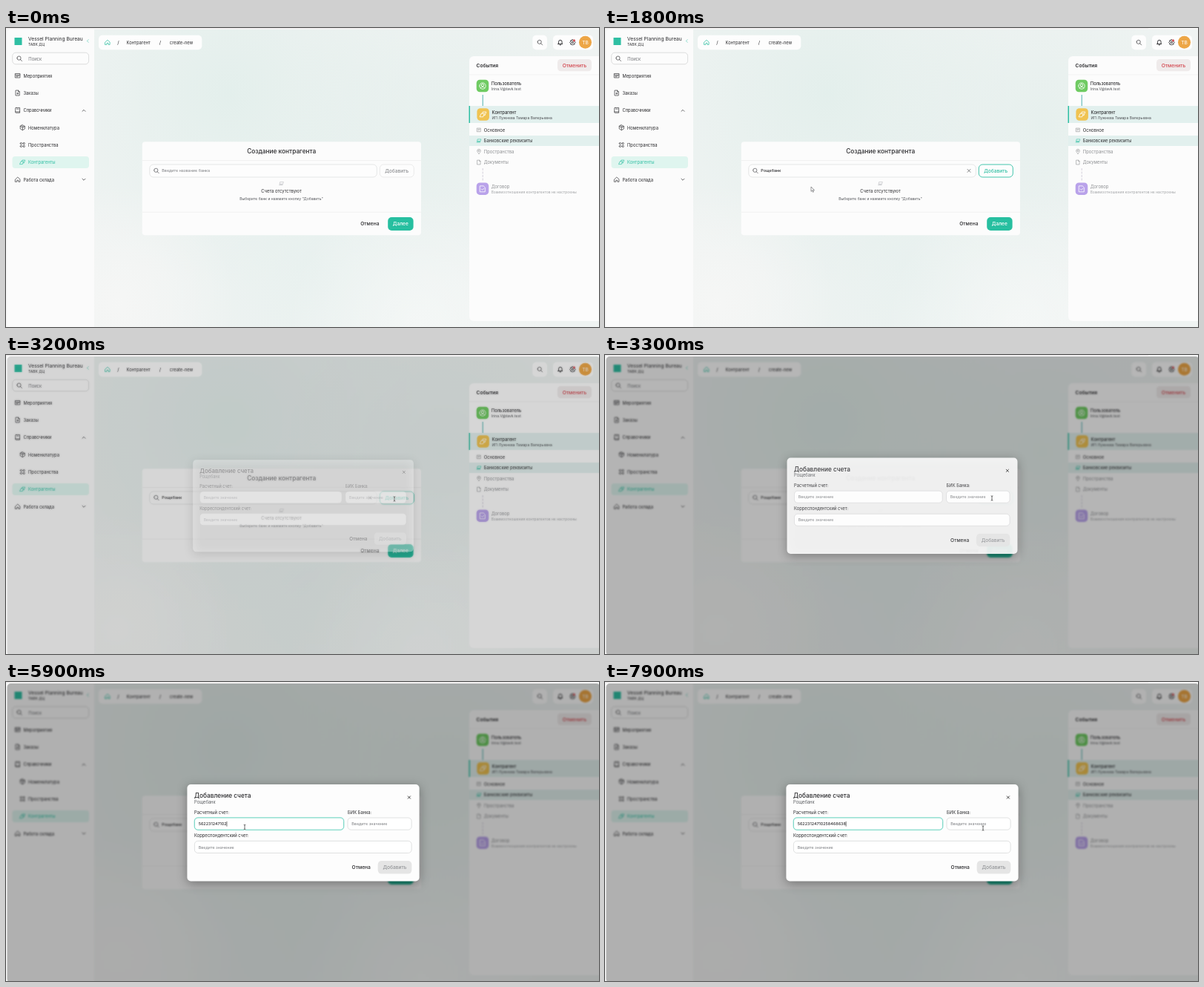
Recreate the animation shown at these times as an HTML page with a canvas. Size 800 by 403 pixels, loop 8000 ms.

```html
<!DOCTYPE html>
<html lang="ru">
<head>
<meta charset="utf-8">
<title>Создание контрагента</title>
<style>
html, body { margin: 0; width: 100%; height: 100%; overflow: hidden; background: #f6f6f6; }
canvas { display: block; width: 800px; height: 403px; }
</style>
</head>
<body>
<canvas id="stage"></canvas>
<script>
const W = 800, H = 403, LOOP = 8000;
const dpr = window.devicePixelRatio || 1;
const INK = '#2b2b2e', GREY = '#8d8f92', TEAL = '#2fbfa3', LINE = '#dcdddd';
const BANK = 'Рощебанк', ACCOUNT = '56223124710258468638';
const FONT = 'Inter, "Open Sans", sans-serif';

function makeCtx(canvas) {
  canvas.width = W * dpr;
  canvas.height = H * dpr;
  const c = canvas.getContext('2d');
  c.scale(dpr, dpr);
  return c;
}
const stage = makeCtx(document.getElementById('stage'));
const page = makeCtx(document.createElement('canvas'));
let g = page;

const ICONS = {
  home: 'M3 11 12 3l9 8v10h-6v-6h-6v6H3z',
  search: 'M3 10.5a7.5 7.5 0 1 0 15 0a7.5 7.5 0 1 0-15 0M16 16l6 6',
  calendar: 'M3 4h18v16H3zM3 9h18M7 13h4M14 13h3M7 16.500h4',
  doc: 'M5 2h9l5 5v15H5zM14 2v5h5M9 14h6M12 11v6',
  file: 'M5 2h9l5 5v15H5zM14 2v5h5',
  book: 'M5 2h15v20H5a2 2 0 0 1-2-2V4a2 2 0 0 1 2-2M3 18h17M8 7h8',
  box: 'M12 2 21 7v10l-9 5-9-5V7zM3 7l9 5 9-5M12 12v10M7.500 4.500l9 5',
  grid: 'M3 6.500a3.500 3.500 0 1 0 7 0a3.500 3.500 0 1 0-7 0M14 6.500a3.500 3.500 0 1 0 7 0a3.500 3.500 0 1 0-7 0M3 17.500a3.500 3.500 0 1 0 7 0a3.500 3.500 0 1 0-7 0M14 17.500a3.500 3.500 0 1 0 7 0a3.500 3.500 0 1 0-7 0',
  deal: 'M7 9h9l-4 11H2zM9 9l2-5h11l-4 11h-4',
  bell: 'M6 17v-7a6 6 0 0 1 12 0v7l2 1H4zM10 21.500h4',
  gear: 'M12 2l3 3h4v4l3 3-3 3v4h-4l-3 3-3-3H5v-4l-3-3 3-3V5h4zM9 12a3 3 0 1 0 6 0a3 3 0 1 0-6 0',
  pin: 'M12 22C6 15 4 13 4 9a8 8 0 0 1 16 0c0 4-2 6-8 13zM9 9a3 3 0 1 0 6 0a3 3 0 1 0-6 0',
  user: 'M2 12a10 10 0 1 0 20 0a10 10 0 1 0-20 0M8 9.500a4 4 0 1 0 8 0a4 4 0 1 0-8 0M5 19c3-5 11-5 14 0',
  edit: 'M4 4h16v16H4zM8 9h8M8 14h5',
  check: 'M4 3h11l5 5v14H4zM8 13l3 3 5-5',
  cards: 'M7 5h15l-3 9H5zM2 19h15M4 16.500h14',
  down: 'M4 8l8 8 8-8',
  up: 'M4 16l8-8 8 8',
  left: 'M16 4l-8 8 8 8',
  cross: 'M4 4l16 16M20 4 4 20'
};

function icon(name, x, y, size, color, weight = 1.9) {
  g.save();
  g.translate(x - size / 2, y - size / 2);
  g.scale(size / 24, size / 24);
  g.strokeStyle = color;
  g.lineWidth = weight;
  g.lineCap = g.lineJoin = 'round';
  g.stroke(new Path2D(ICONS[name]));
  g.restore();
}

// x1, y1, x2, y2 are the edges of the box
function box(x1, y1, x2, y2, r, fill, stroke, width = 0.7) {
  g.beginPath();
  g.roundRect(x1, y1, x2 - x1, y2 - y1, r);
  if (fill) { g.fillStyle = fill; g.fill(); }
  if (stroke) { g.strokeStyle = stroke; g.lineWidth = width; g.stroke(); }
}

// y is the middle of the capitals
function text(s, x, y, size = 5.83, color = INK, weight = 400, align = 'left') {
  g.font = `${weight} ${size}px ${FONT}`;
  g.textAlign = align;
  g.fillStyle = color;
  g.fillText(s, x, y + size * 0.364);
  return g.measureText(s).width;
}

function line(x1, y1, x2, y2, color, width = 0.6, dash = []) {
  g.beginPath();
  g.moveTo(x1, y1);
  g.lineTo(x2, y2);
  g.setLineDash(dash);
  g.strokeStyle = color;
  g.lineWidth = width;
  g.stroke();
  g.setLineDash([]);
}

function glow(x, y, r, rgb, alpha) {
  const grad = g.createRadialGradient(x, y, 0, x, y, r);
  grad.addColorStop(0, `rgba(${rgb},${alpha})`);
  grad.addColorStop(1, `rgba(${rgb},0)`);
  g.fillStyle = grad;
  g.fillRect(119, 0, W - 119, H);
}

function clipFrame() {
  g.beginPath();
  g.roundRect(1.5, 2, W, H, 5);
  g.clip();
}

function drawSidebar() {
  box(1, 1, 119, H, 0, '#fbfbfb');
  box(11.5, 13, 21.5, 23, 0, TEAL);
  text('Vessel Planning Bureau', 30, 14.9, 6.67);
  text('ТАВК ДЦ', 30, 22.1, 5);
  icon('left', 110.3, 17.5, 5.5, TEAL, 2.4);
  box(8.7, 33.2, 111.6, 48.8, 4.5, '#fcfcfc', '#cfd0d0');
  icon('search', 18, 41.1, 8.3, INK);
  text('Поиск', 30.3, 41.5, 5.83, '#707276');
  box(8.5, 173, 112, 189, 4, '#dff5ef');

  const menu = [
    ['calendar', 'Мероприятия', 0], ['doc', 'Заказы', 0], ['book', 'Справочники', 0],
    ['box', 'Номенклатура', 1], ['grid', 'Пространства', 1], ['deal', 'Контрагенты', 1],
    ['home', 'Работа склада', 0]
  ];
  menu.forEach(([name, label, deep], i) => {
    const y = 64.4 + i * 23.33, color = i === 5 ? TEAL : INK;
    icon(name, deep ? 22.3 : 15.8, y - 0.2, 8.3, color);
    text(label, deep ? 30 : 23.4, y, 5.83, color);
  });
  icon('up', 105, 111.3, 6, INK, 2.8);
  icon('down', 105, 204.2, 6, INK, 2.8);
}

function drawHeader() {
  box(125, 9.7, 264.3, 29.2, 5, '#fdfdfd');
  icon('home', 137, 19.3, 8.3, TEAL, 2.1);
  text('/', 150.3, 19.5, 6.67);
  text('Контрагент', 162.5, 19.6);
  text('/', 206.8, 19.5, 6.67);
  text('create-new', 220.8, 19.6);
  box(710.3, 9.7, 730, 29.2, 5, '#fdfdfd');
  icon('search', 720.2, 19.4, 8.3, INK);
  box(738, 9.7, 792, 29.2, 5, '#fdfdfd');
  icon('bell', 747.8, 19.3, 9, INK, 2.5);
  icon('gear', 764.4, 19.4, 9, INK, 2.5);
  box(764.8, 15.2, 768, 18.4, 1.6, '#d9545a');
  box(773, 10.8, 790, 27.8, 8.5, '#eda646');
  text('ТВ', 781.5, 19.5, 6.67, '#fff', 400, 'center');
}

function badge(name, x, y, color) {
  box(x, y, x + 16.5, y + 16.5, 4.5, color);
  icon(name, x + 8.25, y + 8.25, 10, '#fff', 2);
}

function drawEvents() {
  box(625, 38, 806, 395, 6, '#fcfcfc');
  text('События', 634.5, 50.5, 6.67, INK, 600);
  box(744, 42, 790, 58.2, 4.5, '#efebeb');
  text('Отменить', 767, 50.4, 6.67, '#d3474f', 500, 'center');
  line(625, 63, W, 63, '#ececec');

  badge('user', 634.7, 69.8, '#6fcb62');
  text('Пользователь', 654.8, 75.3, 5.83, INK, 500);
  text('Irina.V@tavk.test', 654.8, 82.6, 5, '#4c4e52');
  line(643.2, 90, 643.2, 105, '#4cb3ad', 1);

  box(625, 105, W, 128, 0, '#e2f0ee');
  box(624.5, 105, 626, 128, 0, TEAL);
  badge('deal', 635.4, 108.2, '#f0c352');
  text('Контрагент', 655.6, 113.8, 5.83, INK, 500);
  text('ИП Лужнева Тамара Валерьевна', 655.6, 121, 5, '#4c4e52');

  box(625, 145, W, 159, 0, '#e2f0ee');
  const steps = [
    ['edit', 'Основное', INK, GREY], ['cards', 'Банковские реквизиты', INK, TEAL],
    ['pin', 'Пространства', GREY, GREY], ['file', 'Документы', GREY, GREY]
  ];
  steps.forEach(([name, label, ink, tint], i) => {
    const y = 137.5 + i * 14.55;
    icon(name, 638, y - 0.1, 7, tint, 2);
    text(label, 644.8, y, 5.83, ink);
  });
  line(643.2, 189, 643.2, 206, '#c9c6d4', 0.8, [3, 1.5]);
  badge('check', 634.7, 208.4, '#b9a2ea');
  text('Договор', 654.8, 214.2, 5.83, GREY);
  text('Взаимоотношения контрагентов не настроены', 654.8, 221, 5, '#a2a4a7');
}

function drawForm(bank) {
  box(183.8, 153.3, 560, 279.2, 4, '#fcfcfc');
  text('Создание контрагента', 371.7, 166.4, 8.33, INK, 500, 'center');
  line(184, 178.6, 560, 178.6, '#e8e8e8');
  box(193.8, 184, 500.3, 201, 5, '#fdfdfd', LINE);
  icon('search', 202.8, 192.3, 8.3, '#44464a');
  if (bank) {
    text(bank, 210.3, 192.5, 5.42, INK, 500);
    icon('cross', 491, 192.4, 6, '#44464a', 2.6);
  } else {
    text('Введите название банка', 210.3, 192.5, 5.42, '#7c7e82');
  }
  box(504.3, 184, 550.3, 201, 5, '#fdfdfd', bank ? TEAL : '#e2e2e2', bank ? 0.9 : 0.7);
  text('Добавить', 527.3, 192.6, 6.67, bank ? TEAL : GREY, 500, 'center');

  icon('cards', 371.5, 209.6, 7, '#b9bbbd', 2);
  text('Счета отсутствуют', 371.5, 220.1, 5.83, INK, 400, 'center');
  text('Выберите банк и нажмите кнопку "Добавить"', 371.5, 229.8, 5, '#55575b', 400, 'center');

  line(184, 248.2, 560, 248.2, '#e8e8e8');
  text('Отмена', 490.8, 264, 6.67, INK, 500, 'center');
  box(515.2, 255, 549.6, 273, 5, '#27bfa0');
  text('Далее', 532.4, 264, 6.67, '#fff', 500, 'center');
}

function drawPage(bank) {
  g = page;
  box(0, 0, W, H, 0, '#f7f7f7');
  box(0, 0, 733, 1, 0, '#efebec');
  g.save();
  clipFrame();
  box(119, 0, W, H, 0, '#eff3f2');
  glow(300, 90, 260, '218,236,231', 0.55);
  glow(590, 130, 220, '222,237,233', 0.5);
  glow(420, 330, 230, '226,239,236', 0.5);
  glow(150, 370, 160, '247,247,246', 0.8);
  glow(560, 400, 180, '247,249,248', 0.7);
  drawSidebar();
  drawHeader();
  drawEvents();
  drawForm(bank);
  g.restore();
}

function input(x1, y1, x2, y2, value, focused, caret) {
  if (focused) box(x1, y1, x2, y2, 4.5, null, 'rgba(70,205,185,.25)', 2);
  box(x1, y1, x2, y2, 4.5, '#fff', focused ? '#3fc4ae' : '#d3d4d5');
  const y = (y1 + y2) / 2 + 0.2;
  const w = value ? text(value, x1 + 5.3, y, 5.42, INK, 500) : 0;
  if (!value) text('Введите значение', x1 + 5.3, y, 5.42, '#7c7e82');
  if (caret) line(x1 + 5.6 + w, y - 3.4, x1 + 5.6 + w, y + 3.4, '#111');
}

function drawModal(a, account, focused, caret) {
  const s = 0.9 + 0.1 * a;
  g.save();
  g.globalAlpha = Math.pow(a, 1.5);
  g.translate(401, 203.2);
  g.scale(s, s);
  g.translate(-401, -203.2);
  g.shadowColor = 'rgba(0,0,0,.35)';
  g.shadowBlur = 14 * dpr;
  g.shadowOffsetY = 3 * dpr;
  box(244.4, 138, 557.6, 268.5, 5, '#fdfdfd');
  g.shadowColor = 'transparent';
  text('Добавление счета', 254, 153.3, 8.33, INK, 500);
  text(BANK, 254, 161.5, 5.83, '#5c5e62');
  icon('cross', 543.9, 155.5, 5, '#222', 4);
  text('Расчетный счет:', 254, 175.8);
  text('БИК Банка:', 461, 175.8);
  input(254.4, 183, 455.6, 199.2, account, focused, caret);
  input(461, 183, 547.1, 199.2);
  text('Корреспондентский счет:', 254, 207.1);
  input(254.4, 214.3, 547.1, 230.5);
  text('Отмена', 479.2, 249.9, 6.67, INK, 500, 'center');
  box(501.7, 241, 547.3, 258.6, 5, '#e5e5e5');
  text('Добавить', 524.5, 249.9, 6.67, '#939598', 500, 'center');
  g.restore();
}

const clamp = v => Math.max(0, Math.min(1, v));
const ease = v => { v = clamp(v); return v * v * (3 - 2 * v); };
const typed = (s, t, start, step) => t < start ? '' : s.slice(0, Math.floor((t - start) / step) + 1);

// start, end, x, y of each pointer move
const MOVES = [[1900, 2600, 524, 194], [3200, 3300, 522, 193], [3600, 4200, 322, 195.500], [7200, 7800, 510, 197]];
function pointer(t) {
  let x = 278, y = 214;
  for (const [from, to, tx, ty] of MOVES) {
    const k = ease((t - from) / (to - from));
    x += (tx - x) * k;
    y += (ty - y) * k;
  }
  return [x, y];
}

function drawPointer(t) {
  if (t < 1600) return;
  const [x, y] = pointer(t);
  g.save();
  g.translate(x, y);
  if (y < 201) {
    const beam = new Path2D('M-1.3-3.200Q0-3.200 0-2.200V2.200Q0 3.200-1.3 3.200M1.3-3.200Q0-3.200 0-2.200M0 2.200Q0 3.200 1.3 3.200');
    g.lineWidth = 1.5;
    g.strokeStyle = 'rgba(255,255,255,.7)';
    g.stroke(beam);
    g.lineWidth = 0.75;
    g.strokeStyle = '#333';
    g.stroke(beam);
  } else {
    const arrow = new Path2D('M0 0V6.300L1.500 4.900 2.500 7.300 3.500 6.800 2.500 4.600H4.500Z');
    g.fillStyle = '#fff';
    g.fill(arrow);
    g.lineWidth = 0.6;
    g.strokeStyle = '#55565a';
    g.stroke(arrow);
  }
  g.restore();
}

function render(t) {
  drawPage(typed(BANK, t, 600, 110));
  g = stage;
  g.drawImage(page.canvas, 0, 0, W, H);
  const a = ease((t - 3050) / 300);
  if (a > 0) {
    g.save();
    clipFrame();
    g.globalAlpha = a;
    g.filter = `blur(${1.2 * dpr}px)`;
    g.drawImage(page.canvas, 0, 0, W, H);
    g.filter = 'none';
    g.fillStyle = 'rgba(0,0,0,.3)';
    g.fillRect(0, 0, W, H);
    g.restore();
    const focused = t >= 4300;
    const typing = t >= 4900 && t < 6900;
    const caret = focused && (typing || (t + 100) % 1000 < 500);
    drawModal(a, typed(ACCOUNT, t, 4900, 88), focused, caret);
  }
  drawPointer(t);
}

const begin = performance.now();
function tick() {
  render((performance.now() - begin) % LOOP);
  requestAnimationFrame(tick);
}
tick();
</script>
</body>
</html>
```
